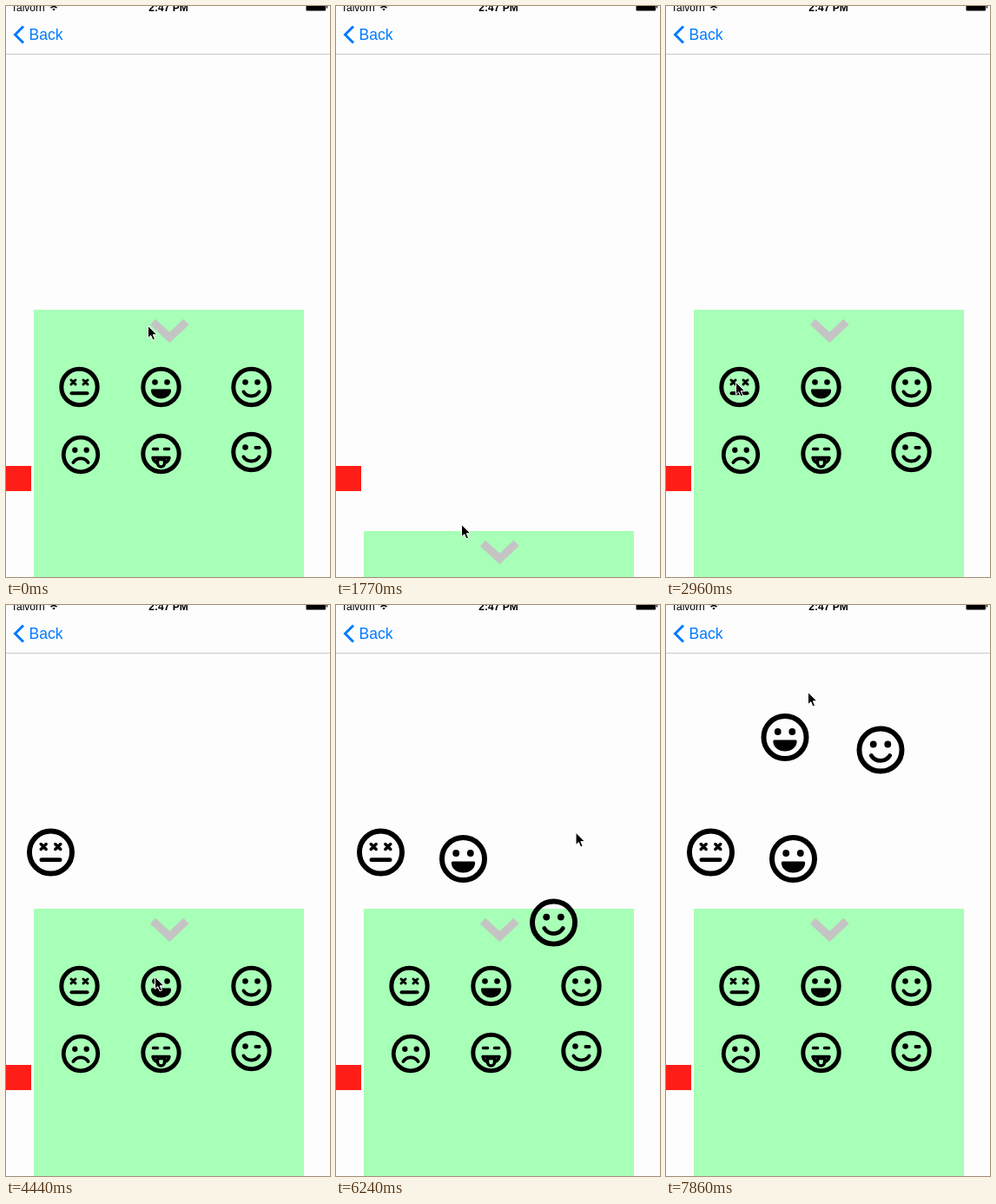
Write an HTML page that moves like this. It is 373 px wide and 658 px high and loops after 8000 ms.

```html
<!DOCTYPE html>
<html lang="en">
<head>
<meta charset="utf-8">
<title>Sticker drawer</title>
<style>
  html, body { margin: 0; height: 100%; overflow: hidden; background: #fdfdfd; }
  svg { display: block; width: 100vw; height: 100vh; }
  text { font-family: "Liberation Sans", Arial, sans-serif; }
  .line { fill: none; stroke: #000; stroke-width: 4; stroke-linecap: round; stroke-linejoin: round; }
</style>
</head>
<body>
<svg viewBox="0 0 373 658">
  <defs>
    <circle id="ring" r="20.7" fill="none" stroke="#000" stroke-width="5"/>
    <g id="eyes"><circle cx="-7" cy="-5.5" r="3.3"/><circle cx="7" cy="-5.5" r="3.3"/></g>
    <path id="curve" class="line" d="M-9 5.500Q-6 10.500 0 10.500T9 5.500"/>
    <g id="dead">
      <use href="#ring"/>
      <path class="line" stroke-width="3" style="stroke-width:3" d="M-9.500-8l5 5m0-5l-5 5M4.500-8l5 5m0-5l-5 5"/>
      <path class="line" d="M-9 7.300H9"/>
    </g>
    <g id="grin">
      <use href="#ring"/><use href="#eyes"/>
      <path d="M-10.500 2.500H10.500Q11.500 2.500 11.500 4A11.500 9.500 0 0 1-11.500 4Q-11.500 2.500-10.500 2.500Z"/>
    </g>
    <g id="smile"><use href="#ring"/><use href="#eyes"/><use href="#curve"/></g>
    <g id="sad">
      <use href="#ring"/><use href="#eyes"/>
      <use href="#curve" transform="translate(0 15) scale(1 -1)"/>
    </g>
    <g id="tongue">
      <use href="#ring"/>
      <path class="line" style="stroke-width:3.5" d="M-9-5.500h5M4-5.500h5"/>
      <path class="line" style="stroke-width:3.500" d="M-9.500 4.500H9.500Q8.500 9 4 10.500V11a4 4 0 0 1-8 0V10.500Q-8.500 9-9.500 4.500ZM-4 10V6.500H4V10"/>
    </g>
    <g id="wink">
      <use href="#ring"/><circle cx="-7" cy="-5.500" r="3.300"/>
      <path class="line" d="M5-5H9"/><use href="#curve"/>
    </g>
  </defs>

  <text x="6" y="5.500" font-size="12">Talvorn</text>
  <path d="M53.300 3.700L55 5.500L56.700 3.700Q55 2.300 53.300 3.700Z"/>
  <path d="M51.500 2.300Q55-1 58.500 2.300M49.500 0Q55-4.500 60.500 0" fill="none" stroke="#000" stroke-width="1.500"/>
  <text x="187" y="5.500" font-size="12" font-weight="bold" text-anchor="middle">2:47 PM</text>
  <path d="M345.500-4H368V4.500Q368 5.500 367 5.500H346.500Q345.500 5.500 345.500 4.500ZM368.800-1.500h1.200v4h-1.200Z"/>
  <path d="M20 23.500L10.500 33L20 42.500" fill="none" stroke="#007aff" stroke-width="3"/>
  <text x="26.500" y="39" font-size="17.500" fill="#007aff">Back</text>
  <rect y="55" width="373" height="1" fill="#c8c8c8"/>
  <rect y="530" width="29" height="29" fill="#ff1d17"/>

  <g id="panel">
    <rect x="32" width="311" height="308" fill="#a8ffb7"/>
    <path d="M169 14L188.300 32L207.500 14" fill="none" stroke="#c4c4c4" stroke-width="9" style="filter:blur(.6px)"/>
    <use href="#dead" x="84.500" y="89"/>
    <use href="#grin" x="178.500" y="89"/>
    <use href="#smile" x="282.500" y="89"/>
    <use href="#sad" transform="translate(86 167) scale(.955)"/>
    <use href="#tongue" x="178.500" y="166"/>
    <use href="#wink" x="282.500" y="164"/>
  </g>
  <use id="face1" href="#dead"/>
  <use id="face2" href="#grin"/>
  <use id="face3" href="#smile"/>
  <use id="face4" href="#grin"/>
  <path id="cursor" d="M.5.500V14.700L3.800 11.700L6 17L8.500 16L6.300 10.800H10.800Z" stroke="#fff" stroke-width="1"/>
</svg>
<script>
const LOOP = 8000;

// Each move: start, end, number of steps, pointer goal;
// out = pointer ease-out power, via = bend of the path,
// drag = what is carried along, with its own ease-in power.
const moves = [
  { start: 290, end: 440, steps: 2, to: [163, 438], out: 1.7,
    drag: { id: 'panel', from: [0, 350], to: [0, 629], power: 2.8 } },
  { start: 740, end: 1330, steps: 5, to: [144, 633] },
  { start: 1770, end: 1920, steps: 2, to: [144, 597], out: 9,
    drag: { id: 'panel', from: [0, 629], to: [0, 350], power: 3.54 } },
  { start: 2220, end: 2960, steps: 6, to: [80, 433], via: [165, 357] },
  { start: 3400, end: 3690, steps: 3, to: [79, 269], out: 1.5,
    drag: { id: 'face1', from: [52, 449], to: [51.5, 285], power: 2.5 } },
  { start: 3990, end: 4440, steps: 4, to: [171, 428] },
  { start: 4890, end: 5040, steps: 2, to: [171, 271], out: 2,
    drag: { id: 'face2', from: [145, 446], to: [146.5, 292.5], power: 1.1 } },
  { start: 5340, end: 5790, steps: 4, to: [278, 431] },
  { start: 6240, end: 6530, steps: 3, to: [274, 152], out: 2.3,
    drag: { id: 'face3', from: [252, 447], to: [247, 167], power: 1.13 } },
  { start: 6830, end: 7260, steps: 4, to: [175, 429] },
  { start: 7710, end: 7860, steps: 2, to: [163, 100], out: 2,
    drag: { id: 'face4', from: [149, 446], to: [137, 152.5], power: 1.1 } },
];

const el = id => document.getElementById(id);
const mix = (a, b, p) => a.map((v, i) => v + (b[i] - v) * p);
const place = (id, [x, y], scale = 1) =>
  el(id).setAttribute('transform', `translate(${x} ${y}) scale(${scale})`);

function progress({ start, end, steps }, t) {
  if (t < start) return 0;
  const done = Math.floor((t - start) / (end - start) * (steps - 1) + 0.001) + 1;
  return Math.min(done, steps) / steps;
}

function draw(now) {
  const t = now % LOOP;
  let pointer = [163, 368];
  let panel = [0, 350];
  for (const move of moves) {
    const { to, out, via, drag } = move;
    const p = progress(move, t);
    if (drag && drag.id !== 'panel') el(drag.id).style.display = p ? '' : 'none';
    if (!p) continue;
    const q = out ? 1 - (1 - p) ** out : p * p * (3 - 2 * p);
    pointer = via
      ? mix(mix(pointer, via, q), mix(via, to, q), q)
      : mix(pointer, to, q);
    if (!drag) continue;
    const spot = mix(drag.from, drag.to, p ** drag.power);
    if (drag.id === 'panel') panel = spot;
    else place(drag.id, spot, 1.185);
  }
  place('panel', panel);
  place('cursor', pointer);
  requestAnimationFrame(draw);
}
requestAnimationFrame(draw);
</script>
</body>
</html>
```
